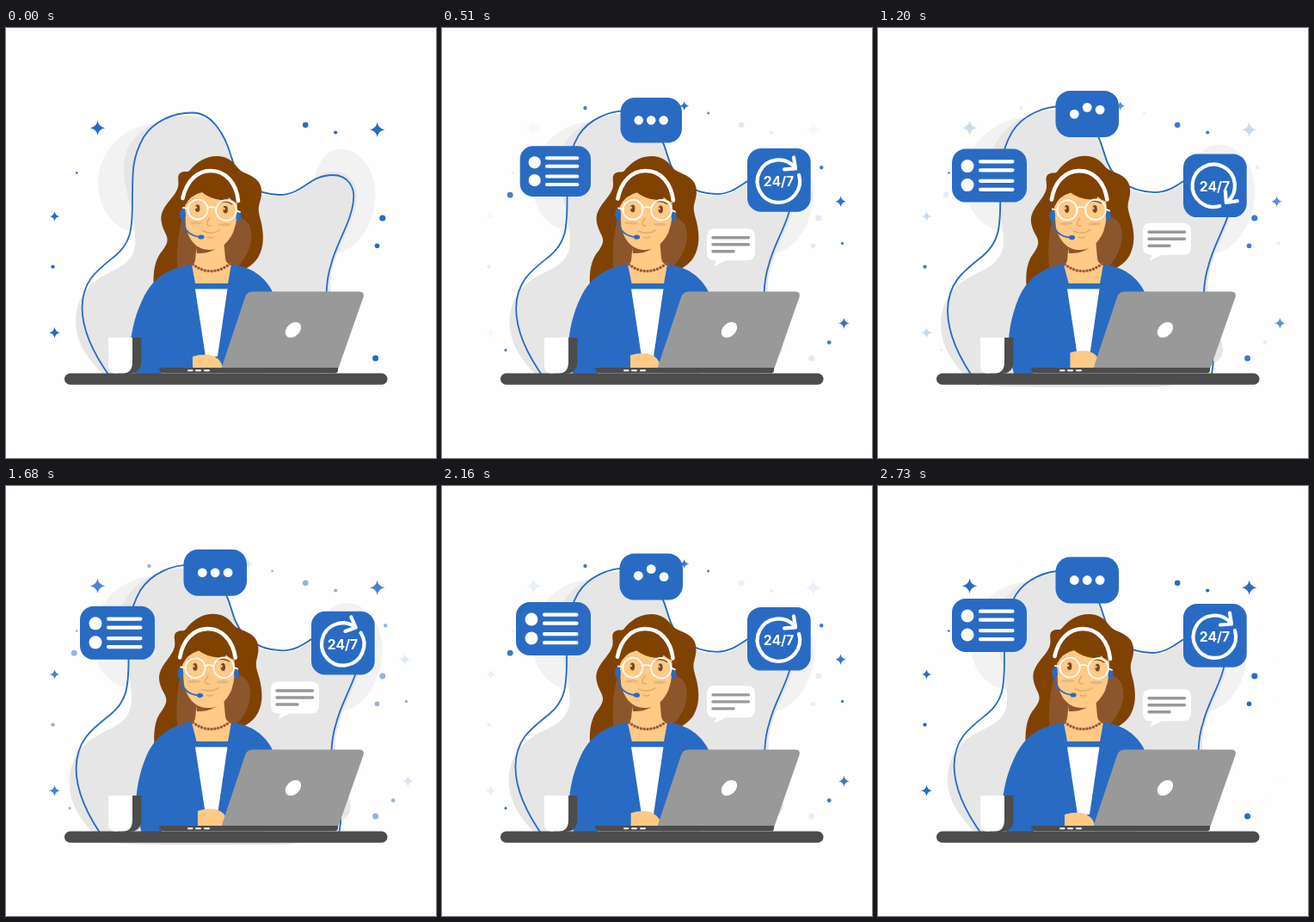
An HTML page that plays this animation: 500 by 500 pixels, repeating every 2.76 s.

```html
<!DOCTYPE html>
<html lang="en">
<head>
<meta charset="utf-8">
<title>Customer support</title>
<style>
  html, body { margin: 0; width: 100%; height: 100%; overflow: hidden; background: #fefefe; }
  svg { display: block; width: 100%; height: 100%; }
  .blue { fill: #296bc3; }
  .hair { fill: #804200; }
  .inner { fill: #8c562c; }
  .skin { fill: #ffc986; }
  .dark { fill: #4c4c4c; }
  .white { fill: #fff; }
  .line { fill: none; stroke-linecap: round; stroke-linejoin: round; }
  .whiteLine { stroke: #fff; }
  .blueLine { stroke: #296bc3; }
  .feature { stroke: #e3a868; }
  text { font: 700 15.7px Inter, "Open Sans", sans-serif; text-anchor: middle; fill: #fff; }
</style>
</head>
<body>
<svg viewBox="0 0 500 500">
  <g id="backdrop">
    <path fill="#f2f2f2" d="M178 111C138 111 107 143 107 180C107 212 127 236 152 237L220 200V115Z"/>
    <path fill="#f2f2f2" d="M389 141C416 141 430 170 429.500 195C428 232 404 262 381 262L350 200C360 180 360 141 389 141Z"/>
    <path fill="#e6e6e6" d="M115 405C95 385 80 365 81 338C83 305 105 291 125 282C155 268 151 250 149 230C145 200 136 185 137 160C138 125 175 102 212 102C250 102 258 130 266 160C275 190 300 198 325 195C350 192 355 168 380 167C400 167 409 182 408 198C405 230 380 260 377 295C376 330 394 352 394 368C394 382 378 386 370 394C356 409 330 410 300 410C230 410 130 412 115 405Z"/>
    <path class="line blueLine" stroke-width="1.800" d="M122 407C106 385 88.500 355 88.500 325C89 293 107 281 127 265C145 250 147 235 147 200C147 165 147 150 160 127C172 108 195 98.500 216 98.500C240 98 255 125 262 150C270 180 290 193 318 194C345 194 352 171 380 171C398 171 406 186 404 200C402 225 384 250 378 275C373 290 373 300 372.500 310C371 345 383 370 383 385L380 406"/>
  </g>
  <g id="sparkles" class="blue"></g>

  <g class="head">
    <path class="hair" d="M173 310C169 285 174 268 181 260C188 251 189 247 186 240C182 232 179 224 181 216C185 203 197 196 200 185C202 178 197 170 205 167.500C209 166 212 169 215 164C222 156 232 149 245 149C257 149 264 155 269 162C274 169 283 169 291 176C299 183 298 194 295 203C292 212 295 218 297 227C300 242 300 255 293 267C288 275 280 280 270 284L200 310Z"/>
    <path class="inner" d="M205 220C200 240 197 262 200 284H262C280 270 289 250 284 232C282 225 277 223 268 218Z"/>
  </g>
  <path class="skin" d="M222 250L220 270Q219 275 215 277L217 300H259L262 276Q256 274 255 268L253 245Z"/>
  <path class="inner" d="M221 254L222 262Q242 263 253 248Z"/>
  <g id="arm">
    <path class="blue" d="M216 275C192 279 174 287 161 311C150 333 147 348 144 370L150 406L240 406Z"/>
  </g>
  <path class="blue" d="M215 275L218.500 297H258L262 275C285 277 302 290 310 307L300 402H195L190 300Z"/>
  <path class="white" d="M220 303.500H257.500L246 382H232Z"/>
  <path class="line" stroke="#9a5a3b" stroke-width="3.500" stroke-dasharray="0 3.900" d="M217.500 275Q238 291 261 274"/>
  <g id="hand">
    <path class="skin" d="M217 405V382Q226 379 237 380Q249 383 252 394V405Z"/>
  </g>

  <g class="head">
    <path class="skin" d="M208 205Q210 190 228 187L268 196Q271 220 264 238C257 252 248 258 237 258C221 258 212 246 209 230Z"/>
    <path class="hair" d="M204 207C205 185 216 168 238 167C259 168 270 184 272 204Q265 203 259 197Q259 201 250 200Q236 198 228 191Q214 194 208 207Z"/>
    <path class="line whiteLine" stroke-width="4.600" stroke-linecap="butt" d="M205.500 198C210 177 223 166 238 166C256 166 268 181 270 201"/>
    <ellipse class="blue" cx="205.500" cy="216.500" rx="3.400" ry="6.500"/>
    <ellipse class="blue" cx="270.500" cy="219.500" rx="3" ry="5.800"/>
    <path class="line blueLine" stroke-width="1.800" d="M205 222Q207 241 226 243"/>
    <ellipse class="blue" cx="227" cy="243" rx="3.600" ry="2.600"/>
    <g fill="#eab47a">
      <ellipse cx="221" cy="226.500" rx="7.500" ry="1.800"/>
      <ellipse cx="254" cy="228.500" rx="7.500" ry="1.800"/>
    </g>
    <path class="line feature" stroke-width="1.400" d="M237 221Q230 230 238 230M229 236Q240 241 249 235M235 243Q239 245 242 243"/>
    <path class="line" stroke="#804200" stroke-width="1.300" d="M215 202Q221 197 228 201M248 203Q256 200 263 205"/>
    <g fill="#754a2c">
      <ellipse cx="222.700" cy="209.700" rx="2.700" ry="4.400"/>
      <ellipse cx="255.200" cy="211.200" rx="2.700" ry="4.400"/>
    </g>
    <g class="skin">
      <circle cx="221" cy="208.700" r="1.300"/>
      <circle cx="253.500" cy="210.200" r="1.300"/>
    </g>
    <g class="line whiteLine" stroke-width="1.900">
      <circle cx="223" cy="211" r="11.500"/>
      <circle cx="256" cy="212" r="11.800"/>
      <path d="M234.500 209Q239 207 244 209.500M211.500 210L206 209M267.500 212L272 214"/>
    </g>
  </g>

  <rect class="dark" x="68" y="401.500" width="375.500" height="13.300" rx="6.650"/>
  <path class="dark" d="M138 360H157.500V388Q157 402 143 402H130Z"/>
  <path class="white" d="M119 360H147V388Q147 401.500 136 401.500H127Q119 401.500 119 393Z"/>
  <path fill="#999" d="M250 397L278 313Q280 306.500 287 306.500H411Q417.500 307 415.500 313L386 397Z"/>
  <ellipse class="white" cx="334" cy="351" rx="10.500" ry="7.500" transform="rotate(-43 334 351)"/>
  <path fill="#999" d="M181 401.200H384V402H181Z"/>
  <path class="dark" d="M178 395H386V398Q386 401.300 382 401.300H184Q178 401 178 395Z"/>
  <path class="line whiteLine" stroke-width="2" d="M212 398.300H216.500M221 398.300H226M231 398.300H236"/>

  <g id="list">
    <rect class="blue" x="86" y="131" width="87" height="62" rx="16"/>
    <g class="white"><circle cx="104" cy="151" r="7.500"/><circle cx="104" cy="173" r="7.500"/></g>
    <path class="line whiteLine" stroke-width="4.200" d="M119 145.700H156.500M119 155.700H156.500M119 168.200H156.500M119 178.200H156.500"/>
  </g>
  <g id="typing">
    <rect class="blue" x="206.500" y="82.500" width="73.500" height="54" rx="17"/>
    <g id="dots" class="white">
      <circle cx="228.300" cy="109.500" r="5.400"/><circle cx="243.200" cy="109.500" r="5.400"/><circle cx="258.100" cy="109.500" r="5.400"/>
    </g>
  </g>
  <g id="hours">
    <rect class="blue" x="355" y="137" width="73.700" height="73.700" rx="16"/>
    <text x="391.500" y="181">24/7</text>
    <path id="arrow" class="line whiteLine" stroke-width="4.200" d="M415 168A24.700 24.700 0 1 1 410 159M409 147.500L411 160.500L398 161.500"/>
  </g>
  <g id="chat">
    <path class="white" d="M317 236.300H355Q364 236.300 364 245.300V264.300Q364 273.300 355 273.300H330L316.500 280L319 273.300H317Q308 273.300 308 264.300V245.300Q308 236.300 317 236.300Z"/>
    <path class="line" stroke="#999" stroke-width="3.400" d="M315 246.800H356.500M315 254.800H356.500M315 262.800H339"/>
  </g>
</svg>
<script>
  const LOOP = 2760;
  const $ = id => document.getElementById(id);
  const wave = (t, period) => (1 - Math.cos(2 * Math.PI * t / period)) / 2;
  const clamp = x => Math.min(1, Math.max(0, x));
  const ease = (t, start, end) => wave(clamp((t - start) / (end - start)), 2);
  const set = (el, transform) => el.setAttribute('transform', transform);

  const dot = (x, y, r) => `<circle cx="${x}" cy="${y}" r="${r}"/>`;
  const star = (x, y, r) => {
    const k = r * 0.14;
    return `<path transform="translate(${x} ${y})" d="M0 ${-r}Q${k} ${-k} ${r} 0Q${k} ${k} 0 ${r}Q${-k} ${k} ${-r} 0Q${-k} ${-k} 0 ${-r}Z"/>`;
  };

  // Each group fades on its period; rising groups start invisible.
  const sparkles = [
    { period: 900, rising: false, draw: star, items: [[106.5, 116.3, 8.8], [431.7, 118.2, 8.8], [56.5, 219, 5.8], [56.5, 354.3, 6.5]] },
    { period: 900, rising: true, draw: star, items: [[281.7, 90.5, 5.6], [463.6, 201.7, 6.4], [467.4, 343.3, 6.4]] },
    { period: 1350, rising: false, draw: dot, items: [[348.2, 112.8, 3.3], [383.2, 121.5, 2.1], [437.8, 221, 3.6], [431.5, 253.3, 2.8], [429.6, 384, 3.5], [82.3, 168.5, 1.3], [54.5, 277.6, 2.2]] },
    { period: 1350, rising: true, draw: dot, items: [[166.5, 93, 2.2], [309.6, 99, 1.4], [79.2, 194.2, 3.4], [74, 374.7, 1.6], [441.2, 162.2, 2.2], [465.5, 250.5, 1.7], [450.2, 365.6, 2.4]] }
  ];
  $('sparkles').innerHTML = sparkles.map(s => `<g>${s.items.map(i => s.draw(...i)).join('')}</g>`).join('');

  // Cards grow from an anchor point, then float with the sway.
  const cards = [
    { el: $('list'), x: 173, y: 193, rise: 10, end: 590 },
    { el: $('typing'), x: 243.2, y: 136.5, rise: -9.8, end: 565 },
    { el: $('hours'), x: 355, y: 210.7, rise: 9.8, end: 450 },
    { el: $('chat'), x: 316.5, y: 280, rise: -10, end: 450 }
  ];
  const heads = document.querySelectorAll('.head');
  const dots = [...$('dots').children];

  function hop(t, index) {
    const start = 855 + index * 145;
    const phase = (t - start + 2 * 1020) % 1020;
    return phase < 300 ? -9 * Math.sin(Math.PI * phase / 300) : 0;
  }

  function render(t) {
    const sway = wave(t, LOOP);
    set($('backdrop'), `translate(245 254) scale(${1 + 0.05 * sway}) translate(-245 -254)`);
    heads.forEach(el => set(el, `rotate(${-2.8 * sway} 238 276)`));
    set($('arm'), `rotate(${-4.6 * sway} 200 280)`);
    set($('hand'), `translate(${6.7 * sway} ${-4.7 * sway})`);

    sparkles.forEach((s, i) => {
      const level = wave(t, s.period);
      $('sparkles').children[i].style.opacity = s.rising ? level : 1 - level;
    });
    cards.forEach(c => {
      const size = ease(t, 60, c.end);
      c.el.style.display = size ? '' : 'none';
      set(c.el, `translate(${c.x} ${c.y + c.rise * sway}) scale(${size}) translate(${-c.x} ${-c.y})`);
    });
    dots.forEach((el, i) => set(el, `translate(0 ${hop(t, i)})`));
    set($('arrow'), `rotate(${360 * ease(t, 900, 1800)} 391.5 174)`);
  }

  const begin = performance.now();
  function tick() {
    render((performance.now() - begin) % LOOP);
    requestAnimationFrame(tick);
  }
  tick();
</script>
</body>
</html>
```
